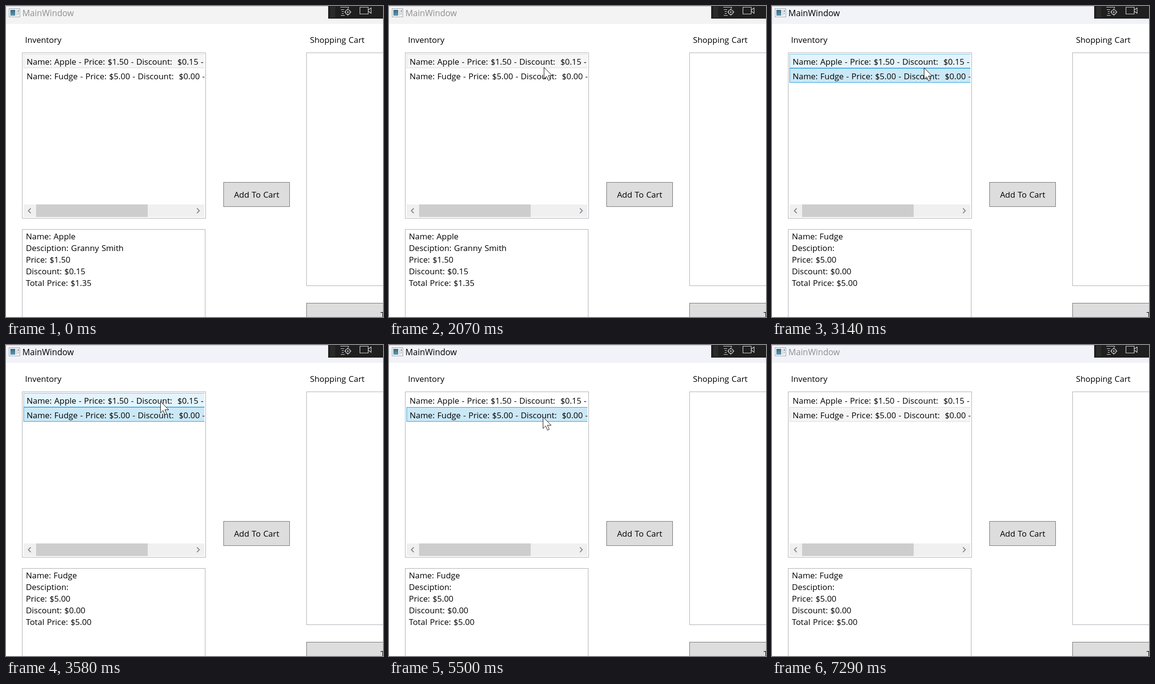
These frames come from a looping animation (777 by 641 pixels, 7.37 s). An HTML page:

```html
<!DOCTYPE html>
<html lang="en">
<head>
<meta charset="utf-8">
<title>Inventory window</title>
<style>
html, body { margin: 0; width: 100%; height: 100%; overflow: hidden; background: #fff; }
svg { display: block; width: 777px; height: 641px; }
text { font: 16.9px "Open Sans", "Noto Sans", sans-serif; word-spacing: .9px; white-space: pre; }
.box { fill: #fff; stroke: #abadb3; }
.button { fill: #ddd; stroke: #707070; }
.button.hover { fill: #bee6fd; stroke: #3c7fb1; }
.row { fill: none; stroke: none; }
.row.hover { fill: #e4f4fc; stroke: #70c0e7; }
.row.active { fill: #cbe8f6; stroke: #26a0da; }
.row.idle { fill: #f6f6f6; stroke: #dadada; }
.icon { fill: none; stroke: #d8d8d8; stroke-width: 1.2; }
</style>
</head>
<body>
<svg viewBox="0 0 777 641">
  <defs>
    <clipPath id="listClip"><path d="M35 98H409V409H35Z"/></clipPath>
    <linearGradient id="pane" x2="0" y2="1">
      <stop stop-color="#3d6a86"/><stop offset="1" stop-color="#5d9ab0"/>
    </linearGradient>
    <pattern id="grip" width="4" height="4" patternUnits="userSpaceOnUse" x="669" y="2">
      <path d="M0 0h1v1H0zM2 2h1v1H2z" fill="#777"/>
    </pattern>
  </defs>

  <!-- Title bar -->
  <rect id="bar" width="777" height="37"/>
  <path d="M0 .5H777" stroke="#c6c7ca"/>
  <rect x="6.5" y="5.5" width="22" height="17" fill="#fafafa" stroke="#9aa0a6"/>
  <rect x="9" y="8" width="10" height="12" fill="url(#pane)"/>
  <path d="M22 8v12" stroke="#d5d8da" stroke-width="3"/>
  <path d="M25.5 8v5M25.5 15v2" stroke="#5d7f96" stroke-width="1.5"/>
  <text id="title" x="33.8" y="21" style="font-size:17.4px">MainWindow</text>

  <!-- Debug toolbar -->
  <path d="M664 0H777V26H664Z" fill="#1f1f1f"/>
  <rect x="669" y="2" width="9" height="21" fill="url(#grip)"/>
  <g class="icon">
    <path d="M689 2.5H706V5M690 7.5H697M692 11.5H696M692 15.5H696M690 19.5H698"/>
    <circle cx="704.5" cy="12.5" r="5"/>
    <path d="M704.5 5V9M704.5 16V20M697 12.5H701M708 12.5H712"/>
    <path d="M729.5 2.5H746.5V16.5H729.5ZM747 8L752.5 4V15L747 11"/>
  </g>
  <circle cx="704.5" cy="12.5" r="1.5" fill="#d8d8d8"/>

  <text x="39.2" y="76">Inventory</text>
  <text x="626.4" y="76">Shopping Cart</text>

  <!-- Inventory list -->
  <rect class="box" x="33.5" y="96.5" width="378" height="341"/>
  <g id="list" clip-path="url(#listClip)"></g>
  <path d="M36 409H409V435H36Z" fill="#f0f0f0"/>
  <path d="M62 409H292V435H62Z" fill="#cdcdcd"/>
  <path d="M51 417L46 422L51 427M393.5 417L398.5 422L393.5 427" fill="none" stroke="#858585" stroke-width="1.8"/>

  <!-- Details, cart and buttons -->
  <rect class="box" x="33.5" y="460.5" width="377" height="300"/>
  <g id="details"></g>
  <rect class="box" x="619.5" y="96.5" width="300" height="480"/>
  <rect class="button" x="448.5" y="363.5" width="136" height="50"/>
  <text x="516.5" y="395" text-anchor="middle">Add To Cart</text>
  <rect id="total" class="button" x="619.5" y="612.5" width="300" height="50"/>
  <text x="772" y="643">Total</text>

  <path id="cursor" d="M.5 .5V24L5.8 18.9L9.7 27.6L13.3 26L9.5 17.4H17.2Z" fill="#fff" stroke="#111"/>
</svg>
<script>
const LOOP = 7370, TICK = 73.3;
const ACTIVATE = 2570, DEACTIVATE = 7220;
const $ = id => document.getElementById(id);

const items = [
  { name: 'Apple', about: 'Granny Smith', price: 1.5, discount: .15 },
  { name: 'Fudge', about: '', price: 5, discount: 0 }
];
const money = n => '$' + n.toFixed(2);
const total = item => money(item.price - item.discount);

// Pointer strokes: a higher power slows the end, bow bends the path to the right.
const strokes = [
  { start: 1490, end: 2150, from: [790, 650], to: [318, 125], power: 3 },
  { start: 2430, end: 2710, from: [317, 130], to: [312, 138] },
  { start: 3070, end: 3290, from: [311, 133], to: [318, 116] },
  { start: 4170, end: 4510, from: [318, 124], to: [317, 141] },
  { start: 4720, end: 4870, from: [317, 143], to: [317, 148] },
  { start: 6140, end: 6790, from: [395, 144], to: [610, 650], bow: 120 }
];
const clicks = [
  { start: 0, item: 0 }, { start: ACTIVATE, item: 1 },
  { start: 3730, item: 0 }, { start: 5500, item: 1 }
];
const latest = (list, t) => list.filter(entry => entry.start <= t).pop();

function pointer(t) {
  const stroke = latest(strokes, t);
  if (!stroke) return [-99, -99];
  const { start, end, from, to, power = 1, bow = 0 } = stroke;
  const tick = Math.floor((t - start) / TICK + .15);
  const u = Math.min(1, tick / Math.round((end - start) / TICK));
  const eased = 1 - (1 - u) ** power;
  const [x, y] = from.map((a, i) => a + (to[i] - a) * eased);
  return [Math.round(x + bow * Math.sin(Math.PI * u)), Math.round(y)];
}

const textLine = (x, y, text) => `<text x="${x}" y="${y}">${text}</text>`;

function showDetails(item) {
  const lines = [`Name: ${item.name}`, `Desciption: ${item.about}`, `Price: ${money(item.price)}`,
    `Discount: ${money(item.discount)}`, `Total Price: ${total(item)}`];
  $('details').innerHTML = lines.map((line, i) => textLine(41, 481 + 24 * i, line)).join('');
}

$('list').innerHTML = items.map((item, i) =>
  `<rect class="row" x="36.5" y="${99.5 + 29 * i}" width="500" height="${28 + i}"/>` +
  textLine(42.5, 121 + 30 * i, `Name: ${item.name} - Price: ${money(item.price)} - ` +
    `Discount:  ${money(item.discount)} - Total Price: ${total(item)}`)).join('');
const rows = document.querySelectorAll('.row');

let shown;
function draw(now) {
  const t = now % LOOP;
  const [x, y] = pointer(t);
  const selected = latest(clicks, t).item;
  const focused = t >= ACTIVATE && t < DEACTIVATE;

  $('bar').style.fill = t < ACTIVATE ? '#f3f3f3' : '#f1f3f9';
  $('title').style.fill = focused ? '#000' : '#8f8f8f';
  $('cursor').setAttribute('transform', `translate(${x} ${y})`);
  $('total').classList.toggle('hover', x >= 619 && y >= 612);

  const over = x >= 36 && x < 409 ? Math.floor((y - 98) / 30) : -1;
  rows.forEach((row, i) => {
    const state = i === selected ? (focused ? 'active' : 'idle') : i === over ? 'hover' : '';
    row.setAttribute('class', 'row ' + state);
  });

  if (shown !== selected) showDetails(items[shown = selected]);
  requestAnimationFrame(() => draw(performance.now() - begin));
}
const begin = performance.now();
draw(0);
</script>
</body>
</html>
```
